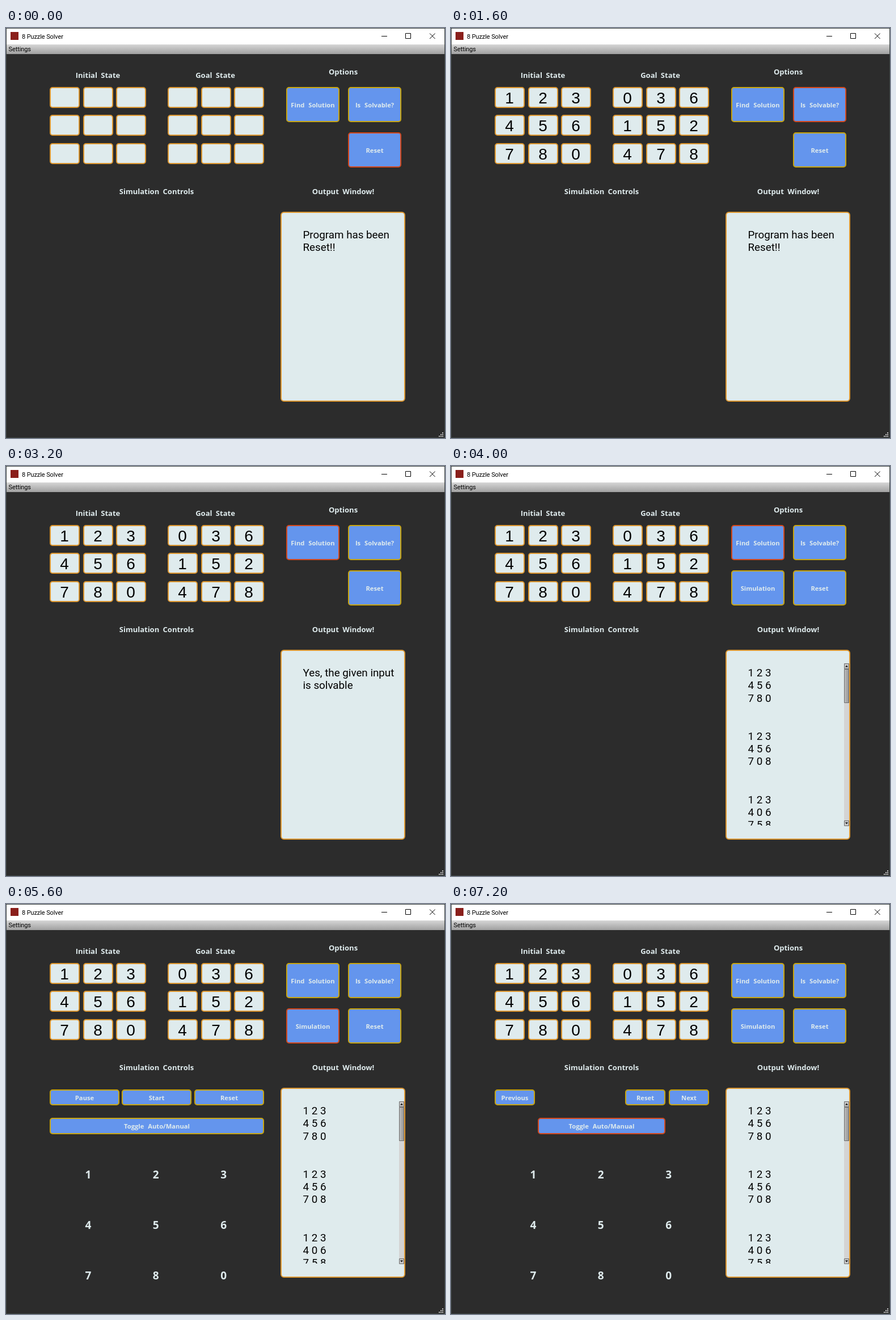
These frames come from a looping animation (774 px wide and 723 px high, 8 s). An HTML page:

```html
<!DOCTYPE html>
<html lang="en">
<head>
<meta charset="utf-8">
<title>8 Puzzle Solver</title>
<style>
  html, body { margin: 0; width: 100%; height: 100%; overflow: hidden; background: #2c2c2c; }
  svg { display: block; width: 774px; height: 723px; }
  text { white-space: pre; }
  .ui { font: 11px Roboto, sans-serif; letter-spacing: -.1px; }
  .head { font: bold 13px "Open Sans", sans-serif; word-spacing: 3px; fill: #dfebed; text-anchor: middle; }
  .label { font: bold 11.2px "Open Sans", sans-serif; word-spacing: 4px; fill: #dfebed; text-anchor: middle; }
  .tile { font: bold 19px "Open Sans", sans-serif; fill: #dfebed; text-anchor: middle; }
  .digit { font: 28px "Liberation Sans", Arial, sans-serif; text-anchor: middle; }
  .out { font: 18.8px Roboto, sans-serif; }
  .field { fill: #dfebed; stroke: #dc962f; stroke-width: 2; }
  .btn { fill: #6495ed; stroke: #c9a50f; stroke-width: 2; }

  .anim { animation: 8s step-end infinite; }
  .filled { animation-name: filled; }
  .msg-reset { animation-name: msg-reset; }
  .msg-yes { animation-name: msg-yes; }
  .solved { animation-name: solved; }
  .board { animation-name: board; }
  .auto { animation-name: auto; }
  .manual { animation-name: manual; }
  .hot-reset { animation-name: hot-reset; }
  .hot-check { animation-name: hot-check; }
  .hot-find { animation-name: hot-find; }
  .hot-sim { animation-name: hot-sim; }
  .hot-toggle { animation-name: hot-toggle; }

  @keyframes filled { 0% { visibility: hidden } 10%, 100% { visibility: visible } }
  @keyframes msg-reset { 0% { visibility: visible } 30%, 100% { visibility: hidden } }
  @keyframes msg-yes { 0%, 50%, 100% { visibility: hidden } 30% { visibility: visible } }
  @keyframes solved { 0% { visibility: hidden } 50%, 100% { visibility: visible } }
  @keyframes board { 0% { visibility: hidden } 70%, 100% { visibility: visible } }
  @keyframes auto { 0%, 90%, 100% { visibility: hidden } 70% { visibility: visible } }
  @keyframes manual { 0% { visibility: hidden } 90%, 100% { visibility: visible } }
  @keyframes hot-reset { 0% { stroke: #d5481a } 10%, 100% { stroke: #c9a50f } }
  @keyframes hot-check { 0%, 40%, 100% { stroke: #c9a50f } 20% { stroke: #d5481a } }
  @keyframes hot-find { 0%, 60%, 100% { stroke: #c9a50f } 40% { stroke: #d5481a } }
  @keyframes hot-sim { 0%, 80%, 100% { stroke: #c9a50f } 60% { stroke: #d5481a } }
  @keyframes hot-toggle { 0% { stroke: #c9a50f } 80%, 100% { stroke: #d5481a } }
</style>
</head>
<body>
<svg id="stage" viewBox="0 0 774 723">
  <defs>
    <linearGradient id="bar" x2="0" y2="1">
      <stop stop-color="#d6d6d6"/><stop offset="1" stop-color="#a0a0a0"/>
    </linearGradient>
    <linearGradient id="thumb">
      <stop stop-color="#bdbdbd"/><stop offset="1" stop-color="#949494"/>
    </linearGradient>
    <pattern id="check" width="2" height="2" patternUnits="userSpaceOnUse">
      <path fill="#f4f4f4" d="M0 0h2v2H0z"/><path fill="#b4b4b4" d="M0 0h1v1H0zM1 1h1v1H1z"/>
    </pattern>
    <clipPath id="view"><path d="M520 348h172v286H520z"/></clipPath>
  </defs>

  <!-- window frame -->
  <path fill="#2c2c2c" d="M0 0h774v723H0z"/>
  <path fill="#fff" d="M1 1h772v28H1z"/>
  <path fill="url(#bar)" d="M1 29h772v17H1z"/>
  <path fill="none" stroke="#3a4240" d="M.5 .5h773v722H.5z"/>
  <path fill="#8a1f1b" d="M8 7h14v14H8z"/>
  <text class="ui" x="28" y="18.5">8 Puzzle Solver</text>
  <text class="ui" x="4.5" y="41">Settings</text>
  <g fill="none" stroke="#000">
    <path d="M662 14.5h10M704.5 9.500h9v9h-9z"/>
    <path d="M747 9.500l9.500 9.500M756.500 9.500l-9.500 9.500"/>
  </g>
  <g id="grip" fill="#c4c4c4"></g>

  <text class="head" x="162" y="88">Initial State</text>
  <text class="head" x="369" y="88">Goal State</text>
  <text class="head" x="594.5" y="82">Options</text>
  <text class="head" x="265.5" y="293">Simulation Controls</text>
  <text class="head" x="594.5" y="293">Output Window!</text>

  <g id="fields"></g>
  <g id="digits" class="anim filled"></g>
  <g id="options"></g>
  <g id="sim" class="anim solved"></g>
  <g id="auto" class="anim auto"></g>
  <g id="manual" class="anim manual"></g>
  <g id="board" class="anim board"></g>

  <!-- output panel -->
  <rect class="field" x="485" y="325" width="218" height="333" rx="5"/>
  <g class="anim msg-reset" id="msgReset"></g>
  <g class="anim msg-yes" id="msgYes"></g>
  <g class="anim solved">
    <g id="steps" clip-path="url(#view)"></g>
    <path fill="url(#check)" d="M693 348h9v287h-9z"/>
    <g stroke="#6e6e6e" fill="#c6c6c6">
      <path d="M693.500 348.500h8v9h-8zM693.500 625.500h8v9h-8z"/>
      <path fill="url(#thumb)" d="M693.500 358.500h8v59h-8z"/>
    </g>
    <path d="M695 354.500h5l-2.500-3zM695 628.500h5l-2.500 3z"/>
  </g>
</svg>
<script>
  const $ = id => document.getElementById(id);

  function add(parent, tag, attrs, content = '') {
    const el = document.createElementNS('http://www.w3.org/2000/svg', tag);
    for (const key in attrs) el.setAttribute(key, attrs[key]);
    el.textContent = content;
    parent.append(el);
  }

  function box(parent, cls, x, y, w, h) {
    add(parent, 'rect', { class: cls, x: x + 1, y: y + 1, width: w - 2, height: h - 2, rx: 4 });
  }

  function button(parent, label, x, y, w, h, hot) {
    box(parent, hot ? `btn anim ${hot}` : 'btn', x, y, w, h);
    add(parent, 'text', { class: 'label', x: x + w / 2, y: y + h / 2 + 4.5 }, label);
  }

  function lines(parent, rows) {
    rows.forEach((row, i) =>
      add(parent, 'text', { class: 'out', x: 523.5, y: 371 + i * 22.35 }, row));
  }

  // input grids
  function grid(left, state) {
    [...state].forEach((n, i) => {
      const x = left + Math.round((i % 3) * 58.6), y = 104 + Math.round(Math.floor(i / 3) * 49.4);
      box($('fields'), 'field', x, y, 53, 37);
      add($('digits'), 'text', { class: 'digit', x: x + 26, y: y + 28.500 }, n);
    });
  }
  grid(77, '123456780');
  grid(285, '036152478');

  button($('options'), 'Find Solution', 494, 104, 94, 62, 'hot-find');
  button($('options'), 'Is Solvable?', 603, 104, 94, 62, 'hot-check');
  button($('options'), 'Reset', 603, 184, 94, 62, 'hot-reset');
  button($('sim'), 'Simulation', 494, 184, 94, 62, 'hot-sim');

  button($('auto'), 'Pause', 77, 327, 123, 28);
  button($('auto'), 'Start', 204, 327, 123, 28);
  button($('auto'), 'Reset', 332, 327, 123, 28);
  button($('auto'), 'Toggle Auto/Manual', 77, 377, 378, 29, 'hot-toggle');

  button($('manual'), 'Previous', 77, 327, 71, 28);
  button($('manual'), 'Reset', 307, 327, 71, 28);
  button($('manual'), 'Next', 384, 327, 71, 28);
  button($('manual'), 'Toggle Auto/Manual', 153, 377, 225, 29, 'hot-toggle');

  [...'123456780'].forEach((n, i) => add($('board'), 'text',
    { class: 'tile', x: 145 + (i % 3) * 119.3, y: 484 + Math.floor(i / 3) * 89 }, n));

  lines($('msgReset'), ['Program has been', 'Reset!!']);
  lines($('msgYes'), ['Yes, the given input', 'is solvable']);
  lines($('steps'), ['1 2 3', '4 5 6', '7 8 0', '', '', '1 2 3', '4 5 6', '7 0 8', '', '', '1 2 3', '4 0 6', '7 5 8']);

  // size grip
  for (let row = 0; row < 3; row++)
    for (let col = 2 - row; col < 3; col++)
      add($('grip'), 'rect', { x: 763 + col * 3, y: 713 + row * 3, width: 2, height: 2 });
</script>
</body>
</html>
```
